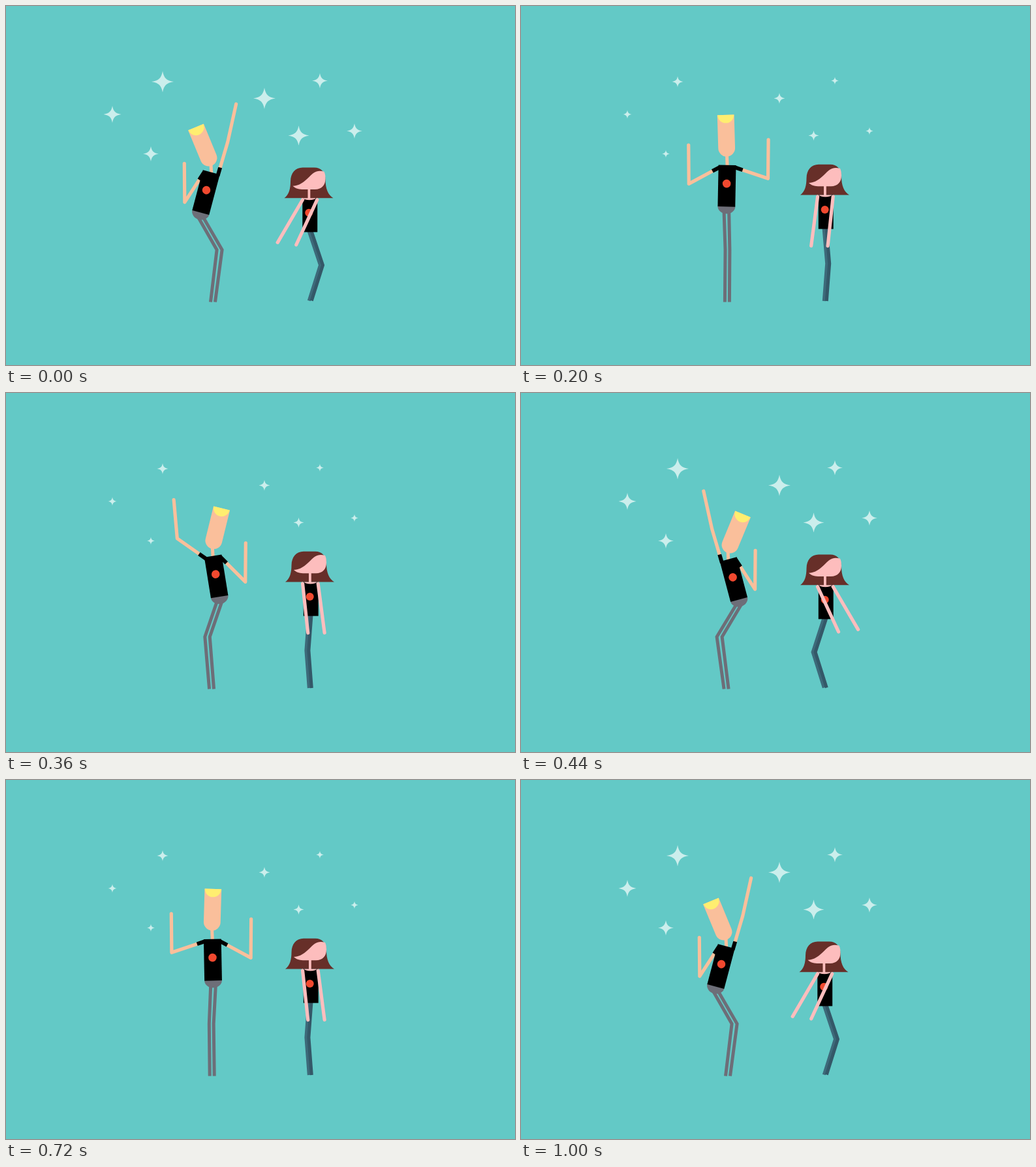
An HTML page with a canvas that plays this animation: 780 by 550 pixels, repeating every 1040 ms.

```html
<!DOCTYPE html>
<html lang="en">
<head>
<meta charset="utf-8">
<title>Two dancers</title>
<style>
html, body { margin: 0; width: 100%; height: 100%; overflow: hidden; background: #63c9c6; }
canvas { display: block; }
</style>
</head>
<body>
<canvas id="stage" width="780" height="550"></canvas>
<script>
const ctx = document.getElementById('stage').getContext('2d');
const STEP = 40, LOOP = 1040, SWING = 11;
const DEG = Math.PI / 180;
const COLOR = {
  back: '#63c9c6', star: '#cbeeec', emblem: '#f1492f', shirt: '#000',
  tan: '#fabf9b', blond: '#ffee70', trousers: '#6d6e78',
  pink: '#fdbdbd', hair: '#672f29', jeans: '#3d6a7a', jeansShade: '#345868'
};

// x, y, half width when bright
const STARS = [
  [240, 116, 17], [396, 141.5, 17], [163, 166, 13.5], [448.5, 198.5, 16],
  [481, 114.5, 12], [534, 191.5, 12], [222, 226.5, 12]
];

const starPath = new Path2D(
  'M0-1C.12-.34 .34-.12 1 0C.34 .12 .12 .34 0 1C-.12 .34-.34 .12-1 0C-.34-.12-.12-.34 0-1Z');
const bob = new Path2D(
  'M456 242.8H474C484 242.8 491 250 491 261C491 275 495 285 503 289.4H428C435 285 437.5 275 437.5 264C437.5 251 445 242.8 456 242.8Z');
const face = new Path2D(
  'M441 271C456 270.5 464 258 471.5 252Q479 246 489 249Q491 253 491 260C491 270 485 276.2 475 276.2H455C449 276.2 444 274 441 271Z');
const manHead = new Path2D('M-12.9 0H12.9V51A12.9 12.9 0 0 1-12.9 51Z');

function box(x, y, w, h, color) {
  ctx.fillStyle = color;
  ctx.fillRect(x, y, w, h);
}

function fill(path, color) {
  ctx.fillStyle = color;
  ctx.fill(path);
}

function oval(x, y, rx, ry, color, end = 2 * Math.PI) {
  ctx.fillStyle = color;
  ctx.beginPath();
  ctx.ellipse(x, y, rx, ry, 0, 0, end);
  ctx.fill();
}

function line(points, width, color, cap = 'round') {
  ctx.beginPath();
  points.forEach(([x, y]) => ctx.lineTo(x, y));
  ctx.lineWidth = width;
  ctx.lineCap = cap;
  ctx.lineJoin = cap === 'round' ? 'round' : 'miter';
  ctx.strokeStyle = color;
  ctx.stroke();
}

function placed(x, y, angle, draw) {
  ctx.save();
  ctx.translate(x, y);
  ctx.rotate(angle);
  draw();
  ctx.restore();
}

// raise: -1 tucked in, 1 stretched up; the upper arm swings, the forearm stays near upright
function drawManArm([x, y], side, raise) {
  const lift = (-26 + raise * (raise > 0 ? 99.6 : 31)) * DEG;
  const flare = (0.5 + 12 * Math.max(raise, 0) ** 2) * DEG;
  const along = r => [x + side * r * Math.cos(lift), y - r * Math.sin(lift)];
  const elbow = along(54.5);
  const hand = [elbow[0] + side * 59.4 * Math.sin(flare), elbow[1] - 59.4 * Math.cos(flare)];
  line([[x, y], elbow, hand], 5.2, COLOR.tan);
  line([[x, y], along(13.5)], 6, COLOR.shirt, 'butt');
}

function drawMan(swing) {
  const s = swing * Math.abs(swing) ** 0.08;
  const sink = Math.abs(s) ** 1.25;
  const collar = [316.2 + 1.5 * s, 243.3 + 11.5 * sink];
  const waist = [316.2 + 17.9 * s, 307 + 9.5 * sink];
  const head = [315.5 + 24.5 * s, 166 + 19.5 * sink];
  const tilt = 22.5 * s * DEG;
  const dx = waist[0] - collar[0], dy = waist[1] - collar[1];
  const length = Math.hypot(dx, dy), lean = Math.atan2(-dx, dy);
  const shoulder = side => [
    collar[0] + side * 10.8 * Math.cos(lean) - 3 * Math.sin(lean),
    collar[1] + side * 10.8 * Math.sin(lean) + 3 * Math.cos(lean)
  ];

  for (const side of [-1, 1]) {
    line([
      [waist[0] + side * 3.8, waist[1] + 7],
      [315.6 - 11.5 * s + side * (3.4 + 0.6 * sink), 373.5],
      [315.8 - 1.2 * s + side * 3.5, 453.5]
    ], 5, COLOR.trousers, 'butt');
  }
  placed(...waist, lean, () => oval(0, -0.5, 13.4, 11.5, COLOR.trousers, Math.PI));

  const chin = [head[0] - 60 * Math.sin(tilt), head[1] + 60 * Math.cos(tilt)];
  line([chin, [collar[0], collar[1] + 1]], 5, COLOR.tan, 'butt');
  placed(...head, tilt, () => {
    fill(manHead, COLOR.tan);
    oval(0, 0, 12.6, 12.6, COLOR.blond, Math.PI);
  });

  for (const side of [-1, 1]) drawManArm(shoulder(side), side, -side * s);
  placed(...collar, lean, () => {
    box(-13.4, 0, 26.8, length, COLOR.shirt);
    oval(-0.4, 28.4, 6.3, 6.3, COLOR.emblem);
  });
}

function drawWoman(side, dip) {
  const dx = dip && side < 0 ? -1.5 : 0, dy = dip ? 4.8 : 0;
  const knee = [466.3 - side * (dip ? 17.2 : 4.4), dip ? 397 : 394.5];
  [COLOR.jeans, COLOR.jeansShade].forEach((color, i) => {
    const shift = i * 4 - 2;
    line([[466 + shift, 340 + dy], [knee[0] + shift, knee[1]], [466.3 + shift, 452 - dip * 0.4]],
      5, color, 'butt');
  });

  placed(dx, dy, 0, () => {
    fill(bob, COLOR.hair);
    fill(face, COLOR.pink);
    box(455.8, 289.4, 22.9, 52.2, COLOR.shirt);
    box(464, 275, 3.8, 16, COLOR.pink);
    oval(466.5, 289.4, 9.5, 3, COLOR.pink, Math.PI);
    oval(465.7, 312, 6, 6, COLOR.emblem);
  });

  // The arm on the side she reaches to swings a little further
  for (const arm of [-1, 1]) {
    const angle = (dip ? 27.6 : 6.8) * (1 + 0.1 * arm * side) * DEG;
    const x = arm < 0 ? 454.6 : 478.2 + dx, y = 292 + dy;
    line([[x, y], [x + side * 76 * Math.sin(angle), y + 76 * Math.cos(angle)]], 5.2, COLOR.pink);
  }
}

function drawStars(scale) {
  for (const [x, y, r] of STARS) {
    placed(x, y, 0, () => {
      ctx.scale(r * scale, r * scale * 0.96);
      fill(starPath, COLOR.star);
    });
  }
}

function render(time) {
  const k = Math.floor(time % LOOP / STEP);
  // There, a short hold, and back again
  const step = Math.max(0, Math.min(k, SWING, 2 * SWING + 2 - k));
  const swing = 2 * step / SWING - 1;
  const dip = Math.abs(swing) > 0.7;
  box(0, 0, 780, 550, COLOR.back);
  drawStars(dip ? 1 : 0.5);
  drawMan(swing);
  drawWoman(Math.sign(swing), dip);
}

const start = performance.now();
function tick() {
  render(performance.now() - start);
  requestAnimationFrame(tick);
}
tick();
</script>
</body>
</html>
```
